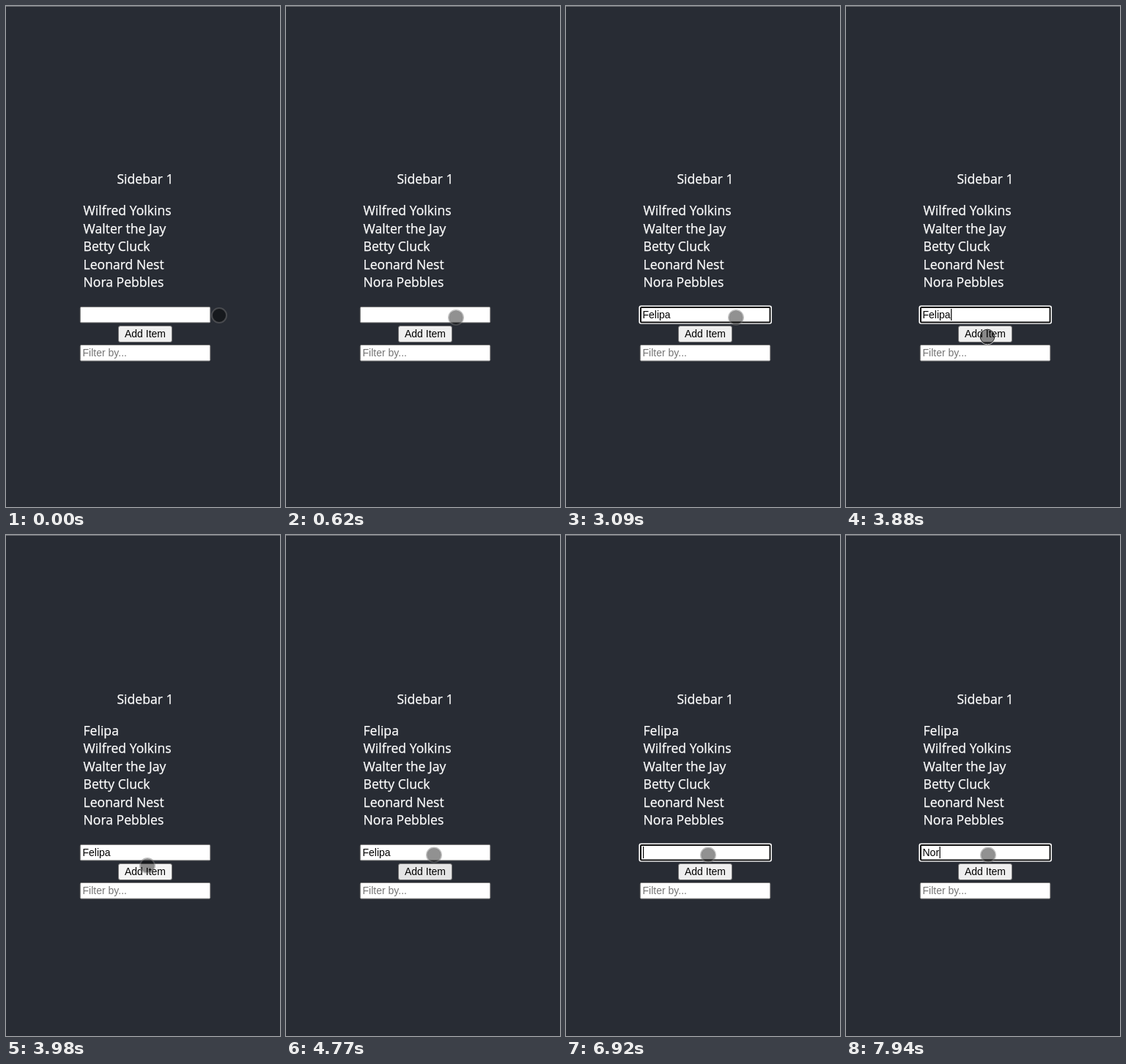
These frames come from a looping animation (374 px wide and 685 px high, 8000 ms). An HTML page:

```html
<!DOCTYPE html>
<html lang="en">
<head>
<meta charset="utf-8">
<title>Sidebar list</title>
<style>
  html, body { margin: 0; width: 100%; height: 100%; overflow: hidden; background: #282c34; }
  svg { display: block; }
  text { white-space: pre; }
  #top, #list {
    font: 17.6px "Open Sans", "Noto Sans", sans-serif;
    fill: #fff; stroke: #fff; stroke-width: .25;
  }
  #form { font: 14px "Liberation Sans", Arial, sans-serif; }
  .box { fill: #fff; stroke: #767676; }
</style>
</head>
<body>
<svg width="374" height="685" viewBox="0 0 374 685">
  <rect width="374" height="1" fill="#6c6f74"/>
  <g id="top"><text x="190" y="243" text-anchor="middle">Sidebar 1</text></g>
  <g id="list"></g>
  <g id="form">
    <rect class="box" x="101.3" y="411.4" width="177.5" height="21.5" rx="1.5"/>
    <g id="ring">
      <rect x="99.4" y="409.4" width="181.6" height="25.4" rx="3" fill="#fff"/>
      <rect x="102" y="412" width="176.5" height="20.4" rx="1" fill="#fff" stroke="#101010" stroke-width="2"/>
    </g>
    <text id="value" x="104.5" y="427"></text>
    <rect id="caret" y="414" width="1.2" height="16"/>
    <rect id="button" x="153.5" y="437.5" width="73" height="22" rx="2.5" stroke="#767676"/>
    <text x="190" y="453" text-anchor="middle">Add Item</text>
    <rect class="box" x="101.3" y="463.5" width="177.5" height="21.7" rx="1.5"/>
    <text x="104.5" y="479" fill="#757575">Filter by...</text>
  </g>
  <g id="touch">
    <circle r="9.5" fill="rgba(0,0,0,.43)"/>
    <circle id="rim" r="10" fill="none" stroke="rgba(115,115,115,.45)" stroke-width="2"/>
    <g id="press" fill="none">
      <circle r="10.8" stroke="#e8e8e8" stroke-opacity=".9"/>
      <circle r="9.8" stroke="#222"/>
    </g>
  </g>
  <path id="arrow" d="M234 427v15.5l3.6-3.4 2.6 5.6 2.3-1-2.5-5.5h4.6z" fill="#fff" stroke="#111" stroke-width=".9"/>
</svg>
<script>
const LOOP = 8000, ADDED = 3980;
const $ = id => document.getElementById(id);
const show = (id, on) => $(id).setAttribute('visibility', on ? 'visible' : 'hidden');
const shift = (id, x, y) => $(id).setAttribute('transform', `translate(${x} ${y})`);

const names = ['Felipa', 'Wilfred Yolkins', 'Walter the Jay', 'Betty Cluck', 'Leonard Nest', 'Nora Pebbles'];
$('list').innerHTML = names.map((name, i) =>
  `<text x="105.5" y="${Math.round(261.6 + i * 24.5)}">${name}</text>`).join('');
const newItem = $('list').firstChild;

// [start, value] pairs
const typed = [[0, ''], [1900, 'F'], [2260, 'Fe'], [2400, 'Fel'], [2510, 'Felip'], [2610, 'Felipa'],
  [5890, 'Felip'], [6000, 'Feli'], [6220, 'Fel'], [6340, 'Fe'], [6460, 'F'], [6690, ''],
  [7610, 'N'], [7820, 'No'], [7940, 'Nor']];
const caretFlips = [1800, 3090, 3620, ADDED, 5130, 5540, 5890, 6460, 6920, 7380, 7610];
const buttonFill = [[0, '#efefef'], [ADDED, '#f5f5f5'], [4190, '#e5e5e5'], [5130, '#efefef']];
const valueAt = (list, t) => list.filter(([start]) => start <= t).pop()[1];

// [first step, last step, number of steps, x, y]
const moves = [[210, 620, 5, 232, 426], [850, 980, 2, 233, 427], [1800, 1900, 2, 232, 426],
  [3330, 3880, 6, 193, 452], [4520, 4770, 3, 202, 437.5], [4880, 5010, 2, 194, 437.5]];

function pointer(t) {
  let x = 291, y = 423;
  for (const [from, to, steps, toX, toY] of moves) {
    if (t < from) break;
    const gap = (to - from) / (steps - 1);
    const p = Math.min(1, (Math.floor((t - from) / gap + 1e-6) + 1) / steps);
    const k = p * p * (3 - 2 * p);
    x += (toX - x) * k;
    y += (toY - y) * k;
  }
  return [x, y];
}

function draw(t) {
  const added = t >= ADDED;
  const between = (a, b) => t >= a && t < b;
  shift('top', 0, added ? -12 : 0);
  shift('list', 0, added ? 12 : 0);
  shift('form', 0, added ? 12 : 0);
  newItem.setAttribute('visibility', added ? 'visible' : 'hidden');

  $('value').textContent = valueAt(typed, t);
  $('caret').setAttribute('x', 105 + $('value').getComputedTextLength());
  show('caret', caretFlips.filter(flip => flip <= t).length % 2);
  show('ring', between(1800, ADDED) || t >= 5130);
  $('button').setAttribute('fill', valueAt(buttonFill, t));

  const arrow = between(1340, 1800), pressed = between(3880, ADDED);
  shift('touch', ...pointer(t));
  show('arrow', arrow);
  $('touch').style.display = arrow ? 'none' : '';
  show('press', pressed);
  show('rim', !pressed);
}

const began = performance.now();
function tick() {
  draw((performance.now() - began) % LOOP);
  requestAnimationFrame(tick);
}
tick();
</script>
</body>
</html>
```
